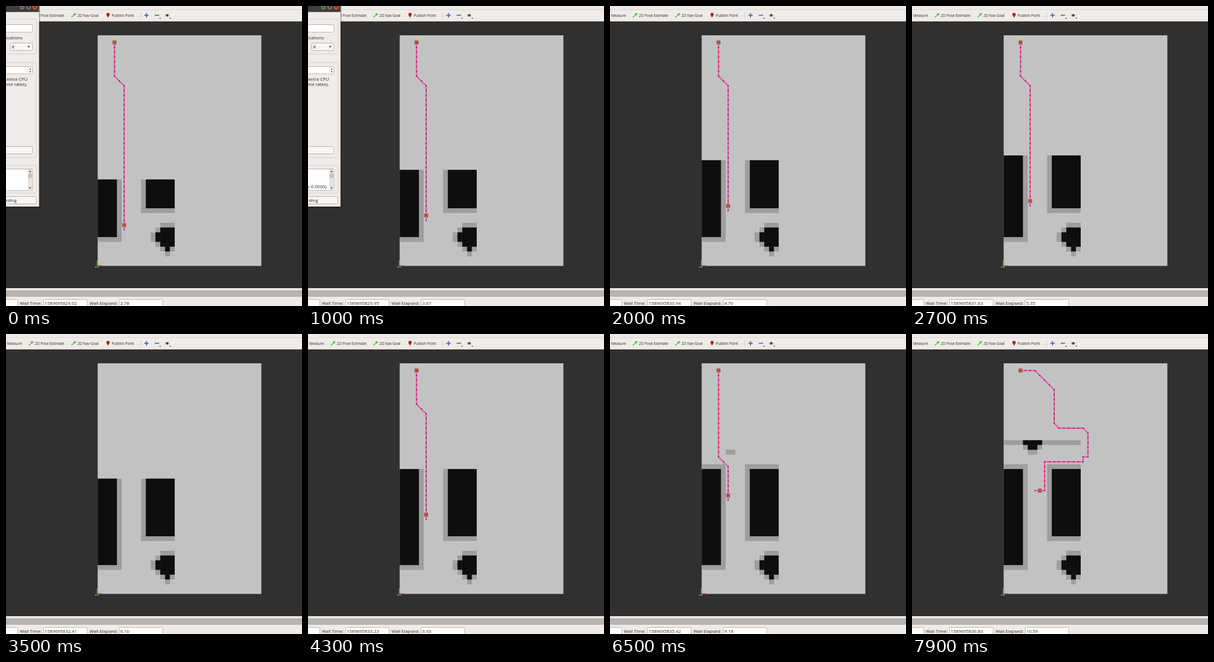
Recreate the animation shown at these times as an HTML page with a canvas. Size 514 px wide and 522 px high, loop 8000 ms.

```html
<!DOCTYPE html>
<html lang="en">
<head>
<meta charset="utf-8">
<title>Grid path planning</title>
<style>
html, body { margin: 0; width: 514px; height: 522px; overflow: hidden; background: #303030; }
canvas { display: block; }
</style>
</head>
<body>
<canvas id="stage" width="514" height="522"></canvas>
<script>
const ctx = document.getElementById('stage').getContext('2d');
const LOOP = 8000, TICK = 100, STEP = 540, LEAD = 210;
const CELL = 8.36, LEFT = 159.2, TOP = 51;
const PANEL = '#f0ebe7', VIEW = '#303030', FREE = '#c2c2c2', NEAR = '#9e9e9e', WALL = '#0e0e0e';
const PINK = '#f64aa8', EDGE = '#b9b2ac', INK = '#2b2826';

// Obstacles: colour, first column, first row, end column, end row
const blocks = [
  [NEAR, 0, 16, 16, 17], [NEAR, 4, 17, 8, 18], [NEAR, 5, 18, 7, 19],
  [WALL, 4, 16, 8, 17], [WALL, 5, 17, 7, 18],
  [NEAR, 0, 21, 5, 43], [WALL, 0, 22, 4, 42],
  [NEAR, 9, 21, 16, 37], [WALL, 10, 22, 16, 36],
  [NEAR, 13, 39, 16, 40], [NEAR, 12, 40, 16, 44], [NEAR, 11, 41, 12, 43],
  [NEAR, 13, 44, 16, 45], [NEAR, 14, 45, 15, 46],
  [WALL, 13, 40, 16, 44], [WALL, 12, 41, 13, 43], [WALL, 14, 44, 15, 45]
];
const detour = [[8, 26], [8, 20], [16, 20], [16, 19], [17, 19], [17, 14], [16, 13],
  [11, 13], [10, 12], [10, 5], [6, 1], [3, 1]];

// Clock readings: time, wall seconds, elapsed seconds
const clock = [[0, 29.02, 2.78], [1000, 29.95, 3.67], [2000, 30.94, 4.70], [3500, 32.41, 6.10],
  [5100, 34.05, 7.77], [6500, 35.42, 9.18], [7900, 36.83, 10.59]];

const colX = c => LEFT + c * CELL;
const rowY = r => TOP + r * CELL;

function rect(color, x, y, w, h) {
  ctx.fillStyle = color;
  ctx.fillRect(x, y, w, h);
}

function text(str, x, y, size, align = 'left') {
  ctx.font = size + 'px "Open Sans", "Noto Sans", sans-serif';
  ctx.textAlign = align;
  ctx.fillStyle = INK;
  ctx.fillText(str, x, y);
}

function box(x, y, w, h, fill = '#fff', r = 2) {
  ctx.beginPath();
  ctx.roundRect(x, y, w, h, r);
  ctx.fillStyle = fill;
  ctx.fill();
  ctx.strokeStyle = EDGE;
  ctx.lineWidth = 1;
  ctx.stroke();
}

function line(color, width, pts) {
  ctx.beginPath();
  pts.forEach(([x, y]) => ctx.lineTo(x, y));
  ctx.strokeStyle = color;
  ctx.lineWidth = width;
  ctx.stroke();
}

function disc(color, x, y, r) {
  ctx.beginPath();
  ctx.arc(x, y, r, 0, 7);
  ctx.fillStyle = color;
  ctx.fill();
}

function triangle(x, y, w, h, color = '#45413e') {
  ctx.beginPath();
  ctx.moveTo(x - w, y);
  ctx.lineTo(x + w, y);
  ctx.lineTo(x, y + h);
  ctx.fillStyle = color;
  ctx.fill();
}

function reading(t, i) {
  let k = 0;
  while (k < clock.length - 2 && t > clock[k + 1][0]) k++;
  const a = clock[k], b = clock[k + 1];
  return a[i] + (b[i] - a[i]) * (t - a[0]) / (b[0] - a[0]);
}

function goalArrow(x) {
  line('#35c535', 1.3, [[x - 4, 20], [x + 2, 14.5]]);
  ctx.beginPath();
  ctx.moveTo(x + 4, 12.2);
  ctx.lineTo(x + 2.6, 17);
  ctx.lineTo(x - 1, 13.4);
  ctx.fillStyle = '#35c535';
  ctx.fill();
}

function toolbar() {
  rect(PANEL, 0, 0, 514, 27);
  rect('#d9d2cd', 0, 5.5, 514, 1);
  rect('#c9c3be', 0, 26, 514, 1);
  text('Measure', 2, 18.6, 6.35);
  goalArrow(43.5);
  text('2D Pose Estimate', 50, 18.6, 6.35);
  goalArrow(117.5);
  text('2D Nav Goal', 124, 18.6, 6.35);
  triangle(177.2, 16, 2.6, 4.6, '#b3301f');
  disc('#b3301f', 177.2, 14.6, 2.9);
  disc('#541510', 177.2, 14.6, 1);
  text('Publish Point', 183.5, 18.6, 6.35);
  rect('#d3ccc6', 233.5, 11, 1, 10);
  line('#4f75ad', 2, [[240.2, 16.2], [247.8, 16.2]]);
  line('#4f75ad', 2, [[244, 12.4], [244, 20]]);
  rect('#71819e', 258.2, 15, 7.6, 2.2);
  triangle(267.6, 20.6, 1.6, 2);
  ctx.beginPath();
  ctx.ellipse(280, 16.2, 4.2, 2.6, 0, 0, 7);
  ctx.fillStyle = '#b9c0cc';
  ctx.fill();
  disc('#343b55', 280, 16.2, 2);
  triangle(285.4, 20.6, 1.6, 2);
}

function statusBar(t) {
  rect(PANEL, 0, 491, 514, 31);
  rect('#b6b2ae', 0, 494.5, 514, 11.5);
  for (const [x, w] of [[-20, 40.5], [65.5, 75.5], [196.5, 75.5]]) box(x, 510.5, w, 20);
  text('Wall Time:', 24, 520, 7.9);
  text((1589695800 + reading(t, 1)).toFixed(2), 67, 520, 7.9);
  text('Wall Elapsed:', 145, 520, 7.9);
  text(reading(t, 2).toFixed(2), 198.5, 520, 7.9);
}

function map(seenRow) {
  rect(FREE, LEFT, TOP, 34 * CELL, 48 * CELL);
  for (const [color, c0, r0, c1, r1] of blocks) {
    const top = Math.max(r0, seenRow);
    if (top < r1) rect(color, colX(c0), rowY(top), (c1 - c0) * CELL, (r1 - top) * CELL);
  }
  rect('#3fc43f', 157.8, 443, 1.4, 9);
  rect('#b03a48', 159, 451.4, 8.5, 1.2);
  rect('#d0d0d0', 155, 453.4, 2, 1.4);
  rect('#d0d0d0', 158.4, 453.6, 2.2, 1.4);
}

// Cells from tail to goal; the robot stands on the second one
function route(n) {
  if (n >= 14) return [[n - 9, 26], ...detour];
  const bend = n < 12 ? 8 : 19;
  return [[5, 40 - n], [5, bend + 2], [3, bend], [3, 1]];
}

function expand(corners) {
  const cells = [corners[0]];
  for (const [c, r] of corners.slice(1)) {
    let [x, y] = cells[cells.length - 1];
    while (x !== c || y !== r) {
      x += Math.sign(c - x);
      y += Math.sign(r - y);
      cells.push([x, y]);
    }
  }
  return cells;
}

function marker([x, y]) {
  rect('#8d4a22', x - 3.3, y - 3.3, 6.6, 6.6);
  rect('#c76a35', x - 2.4, y - 2.4, 4.8, 4.8);
  rect('#d1453f', x - 1, y - 1.5, 2, 3);
}

function path(n) {
  const pts = expand(route(n)).map(([c, r]) => [colX(c + 0.5), rowY(r + 0.5)]);
  marker(pts[1]);
  marker(pts[pts.length - 1]);
  line(PINK, 2.1, pts);
  for (const [x, y] of pts) rect('#571a45', x - 0.9, y - 0.9, 1.8, 1.8);
}

function dialog(t) {
  if (t >= 1200) return;
  const shift = t < 1000 ? 0 : -1;
  ctx.save();
  ctx.globalAlpha = t < 1100 ? 1 : 0.4;
  ctx.translate(shift, 0);
  rect('rgba(0,0,0,.35)', 0, 0, 59, 350.5);
  rect(PANEL, -2, 0, 59.5, 349);
  rect('#403e39', -2, 0, 59.5, 10.5);
  disc('#77736a', 28, 2, 4);
  disc('#77736a', 39, 2, 4);
  disc('#e2502e', 50, 2, 4);
  rect('#3a3833', 26, 2, 4, 1);
  rect('#3a3833', 37.4, 0.6, 3.2, 2.8);
  line('#4a2118', 1, [[48.4, 0.4], [51.6, 3.6]]);
  line('#4a2118', 1, [[51.6, 0.4], [48.4, 3.6]]);

  ctx.strokeStyle = '#d8d1cb';
  ctx.lineWidth = 1;
  for (const [y, h] of [[22.5, 61], [98.5, 165], [277.5, 48]]) {
    ctx.beginPath();
    ctx.roundRect(-20, y, 73, h, 2);
    ctx.stroke();
  }
  box(-20, 32.5, 66, 13);
  text('ifications', 28.5, 58, 7.9, 'right');
  box(7.5, 64.5, 38.5, 13, '#f8f6f4');
  text('R', 10, 74, 7.9);
  triangle(39.5, 69.8, 2.4, 2.8);
  box(-20, 105.5, 66, 12.5);
  rect('#ded7d2', 38, 106, 1, 12);
  triangle(42, 110.4, 1.7, -2.2);
  triangle(42, 113.6, 1.7, 2.2);
  text('t extra CPU', 37.5, 129.5, 7.9, 'right');
  text('me rates).', 37, 138.5, 7.9, 'right');
  box(-20, 244.5, 66, 13, '#f8f6f4');

  box(-20, 283.5, 66, 37.5);
  rect('#e9e3de', 38, 284, 7.6, 36.6);
  rect('#c9c2bc', 38.5, 291.5, 6.8, 7.5);
  triangle(41.9, 289, 2, -2.5);
  triangle(41.9, 315.4, 2, 2.5);
  if (t >= 500) text('s 0.0000).', 35, 316.5, 7.9, 'right');
  box(-20, 331.5, 72.5, 13, '#f8f6f4');
  text('recording', 18.5, 340.5, 7.9, 'right');
  ctx.restore();
}

function draw(t) {
  const phase = (t + LEAD) / STEP, n = Math.floor(phase);
  rect(VIEW, 0, 0, 514, 522);
  map(Math.max(16, 30 - n));
  // the route is cleared shortly before each new plan
  if (phase - n < 0.78) path(n);
  toolbar();
  statusBar(t);
  dialog(t);
}

const start = performance.now();
function frame() {
  const t = Math.max(0, performance.now() - start) % LOOP;
  draw(Math.floor(t / TICK) * TICK);
  requestAnimationFrame(frame);
}
frame();
</script>
</body>
</html>
```
